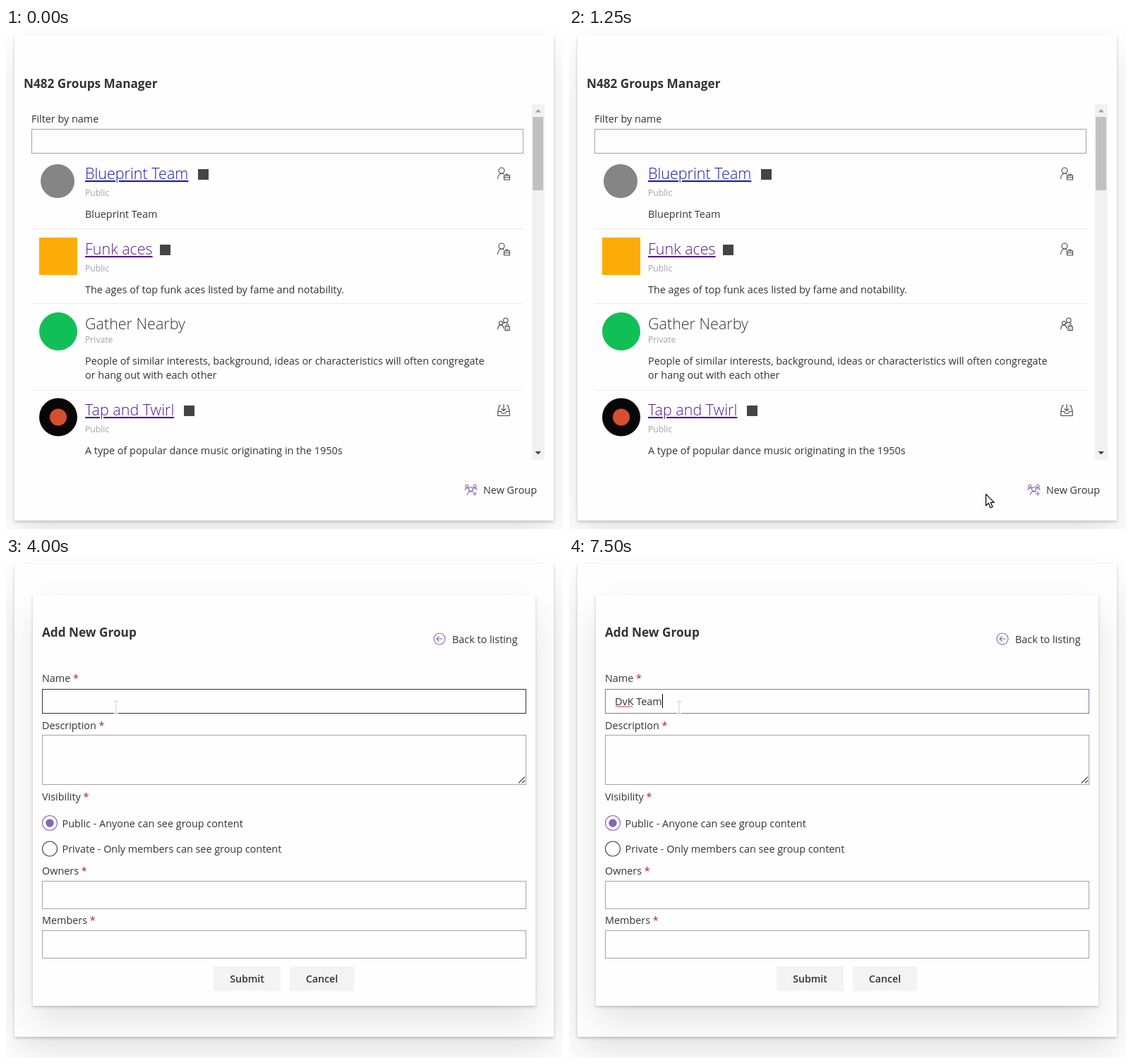
An HTML page that plays this animation: 789x710 px, repeating every 8000 ms.

```html
<!DOCTYPE html>
<html lang="en">
<head>
<meta charset="utf-8">
<title>Groups manager</title>
<style>
  html, body { margin: 0; width: 100%; height: 100%; overflow: hidden; background: #fff; }
  #stage { position: relative; width: 789px; height: 710px; overflow: hidden; }
  .card {
    position: absolute; background: #fefefe;
    box-shadow: 0 2px 4px rgba(0,0,0,.2), 0 24px 48px rgba(0,0,0,.1);
  }
  #outer { left: 12px; top: 10px; width: 764px; height: 688px; }
  #inner { left: 38px; top: 54px; width: 712px; height: 582px; }
  svg { position: absolute; left: 0; top: 0; }
  text { font: 14.4px "Open Sans", "Noto Sans", sans-serif; fill: #333; white-space: pre; }
  .head { font-size: 17.2px; font-weight: 700; }
  .title { font-size: 21.5px; font-weight: 300; }
  .link { text-decoration: underline; }
  .small { font-size: 12.2px; fill: #a3a3a3; }
  .button { font-size: 14.2px; font-weight: 600; text-anchor: middle; }
  .star { fill: #a4262c; }
  .field { fill: #fefefe; stroke: #a3a3a3; }
  .field.hover { stroke: #333; }
  .field.focus { stroke: #7f7a9f; }
  .icon { fill: none; stroke: #444; stroke-width: 1.1; }
  .purple { stroke: #8764b8; }
  .on text { fill: #8764b8; }
</style>
</head>
<body>
<div id="stage">
  <div id="outer" class="card"></div>
  <div id="inner" class="card"></div>
  <svg id="list" width="789" height="710"></svg>
  <svg id="form" width="789" height="710"></svg>
  <svg width="789" height="710">
    <g id="pointer" stroke="#000" stroke-linejoin="round">
      <path id="arrow" fill="#fff" stroke-width="1.2" d="M.6 .6V17L4.4 13.4 7 20 10 18.8 7.3 12.4H12.3Z"/>
      <path id="hand" fill="#fff" stroke-width="1.2" d="M6 16V2.5Q6 .6 7.5 .6T9.2 2.5V9Q12 7.8 12.4 9.8 15 8.8 15.3 11 18.2 10.4 18.2 13V18Q18 21 16 23V26.4H7.5V24L1.5 16.5Q.2 14 2 13.2 3.5 12.8 6 16ZM9.2 9V13M12.4 9.8V13.4M15.3 11V14"/>
      <path id="beam" fill="none" stroke="#cfcfcf" d="M-3 -8.5H-1Q0 -8.5 0 -7.5V7.5Q0 8.5 -1 8.5H-3M3 -8.5H1Q0 -8.5 0 -7.5M0 7.5Q0 8.5 1 8.5H3"/>
    </g>
  </svg>
</div>
<script>
const $ = id => document.getElementById(id);
const text = (x, y, s, cls = "") => `<text x="${x}" y="${y}" class="${cls}">${s}</text>`;
const box = (x, y, w, h, fill) => `<rect x="${x}" y="${y}" width="${w}" height="${h}" fill="${fill}"/>`;
const disc = (x, y, r, fill) => `<circle cx="${x}" cy="${y}" r="${r}" fill="${fill}"/>`;
const icon = (x, y, d, cls = "") => `<path class="icon ${cls}" transform="translate(${x} ${y})" d="${d}"/>`;

const person = "M10 5A4 4 0 1 1 2 5A4 4 0 1 1 10 5M.5 17Q1 9.5 6 9Q8 9 9.5 10.2";
const icons = {
  work: person + "M9.5 12H17.5V18H9.5ZM12 12V10.2H15V12M9.5 14.8H17.5",
  lock: "M7.5 8A2.5 2.5 0 1 1 2.5 8A2.5 2.5 0 1 1 7.5 8M15 4.2A3.2 3.2 0 1 1 8.6 4.2A3.2 3.2 0 1 1 15 4.2M.5 17Q1 11 5 10.6Q8.5 11 9 16M8 9Q10 7.2 12 7.4Q14 7.6 15.3 9M11 13H17.2V18.4H11ZM12.3 13V11.5Q14.1 9 15.9 11.5V13M14.1 15V16.5",
  tray: "M5 3H3L.8 11V17.5H17.2V11L15 3H13M.8 11.5H5.5Q6 14.5 9 14.5T12.5 11.5H17.2M9 1V10.5M5.8 7.5L9 10.5 12.2 7.5",
  group: "M12 7.5A3 3 0 1 1 6 7.5A3 3 0 1 1 12 7.5M5.3 3.2A2 2 0 1 1 1.3 3.2A2 2 0 1 1 5.3 3.2M16.7 3.2A2 2 0 1 1 12.7 3.2A2 2 0 1 1 16.7 3.2M4 16Q4.5 10.8 9 10.6Q11 10.6 12.3 12M.5 9Q1 5.4 5.5 6M17.5 9Q17 5.4 12.5 6M14.5 11V17M11.5 14H17.5"
};

const rows = [
  { top: 179, base: 214, sub: 238, title: "Blueprint Team", color: "#1b1ba8", mark: 272, kind: "Public", lines: ["Blueprint Team"], icon: "work",
    pic: disc(73, 217, 24, "#858585") },
  { top: 284, base: 321, sub: 345, title: "Funk aces", color: "#551a8b", mark: 218, kind: "Public", lines: ["The ages of top funk aces listed by fame and notability."], icon: "work",
    pic: box(47, 297, 54, 53, "#fdab08") },
  { top: 391, base: 427, sub: 446, title: "Gather Nearby", kind: "Private", icon: "lock",
    lines: ["People of similar interests, background, ideas or characteristics will often congregate", "or hang out with each other"],
    pic: disc(74, 430, 27, "#10c056") },
  { top: 513, base: 549, sub: 573, title: "Tap and Twirl", color: "#551a8b", mark: 252, kind: "Public", lines: ["A type of popular dance music originating in the 1950s"], icon: "tray",
    pic: box(47, 524, 54, 55, "#fefefe") + disc(74, 551.5, 27, "#080606") + disc(74, 551.5, 12, "#d6502f") }
];

function drawRow(r, i) {
  const bottom = i < 3 ? rows[i + 1].top : 612;
  const title = r.color
    ? `<text x="112" y="${r.base}" class="title link" style="fill:${r.color}">${r.title}</text>` + box(r.mark, r.base - 14, 15, 15, "#444")
    : text(112, r.base, r.title, "title");
  return `<rect class="row" x="36" y="${r.top}" width="697" height="${bottom - r.top}" fill="#e9e9e9"/>`
    + (i < 3 ? box(36, rows[i + 1].top - (i === 1 ? 1 : 0), 697, 1, "#eaeaea") : "")
    + r.pic + title + text(112, r.sub, r.kind, "small")
    + r.lines.map((s, n) => text(112, r.sub + 31 + n * 20, s)).join("")
    + icon(696, r.base - 17, icons[r.icon]);
}

$("list").innerHTML =
  text(25, 85, "N482 Groups Manager", "head") + text(36, 134, "Filter by name")
  + `<rect class="field" x="36.5" y="143.5" width="696" height="34"/>`
  + rows.map(drawRow).join("")
  + box(745, 108, 18, 504, "#f1f1f1") + box(746, 126, 15, 104, "#c1c1c1")
  + `<path fill="#a3a3a3" d="M749.5 119.5H758L753.8 115Z"/><path fill="#444" d="M749.5 600H758L753.8 604.5Z"/>`
  + `<g id="add">${icon(649.5, 646, icons.group, "purple")}${text(676, 660, "New Group")}</g>`;

const label = (y, s) => text(51, y, `${s} <tspan class="star">*</tspan>`);
const field = (id, y, h) => `<rect id="${id}" class="field" x="51.5" y="${y}.5" width="685" height="${h}"/>`;
const wave = "M66 213" + "l2 -2l2 2".repeat(6);

$("form").innerHTML =
  text(51, 113, "Add New Group", "head")
  + icon(606, 108, "M16 8A8 8 0 1 1 0 8A8 8 0 1 1 16 8M12.5 8H4M7.5 4.5L4 8 7.5 11.5", "purple")
  + text(632, 122, "Back to listing")
  + label(177, "Name") + field("name", 187, 34)
  + label(243.5, "Description") + field("about", 252, 70)
  + `<path class="icon" stroke-width=".8" d="M726 320.5L735 311.5M731 320.5L735 316.5"/>`
  + label(344.5, "Visibility")
  + `<circle class="icon purple" cx="62" cy="377" r="10.5"/>` + disc(62, 377, 5.7, "#8764b8")
  + `<circle class="icon" cx="62" cy="413.5" r="10.5"/>`
  + text(79.5, 382.5, "Public - Anyone can see group content")
  + text(79.5, 419, "Private - Only members can see group content")
  + label(449.5, "Owners") + field("owners", 459, 39)
  + label(520, "Members") + field("members", 529, 39)
  + box(294, 580, 95, 35, "#f3f3f3") + text(341.5, 603, "Submit", "button")
  + box(402, 580, 91, 35, "#f3f3f3") + text(447.5, 603, "Cancel", "button")
  + `<text id="typed" x="65" y="210"></text>`
  + `<path id="wave" fill="none" stroke="#d64545" d="${wave}"/>`
  + `<rect id="caret" y="194" width="1" height="20" fill="#000"/>`;

// time, pointer, x, y, hovered part
const moves = [
  [0, ""], [250, "arrow", 3, 115], [500, "arrow", 201, 141],
  [750, "arrow", 436, 379, 1], [1000, "arrow", 518, 614, 3],
  [1250, "arrow", 590, 660], [1500, "hand", 660, 668, "add"], [1750, "hand", 696, 656, "add"],
  [3000, "arrow", 695, 656], [3250, "arrow", 689, 660],
  [3500, "arrow", 600, 505, "members"], [3750, "beam", 380, 300, "about"],
  [4000, "beam", 156, 213, "name"], [4250, "beam", 156, 213]
];
// time, typed text, caret visible
const typing = [
  [0, "", 0], [4250, "", 1], [4750, "", 0], [5250, "D", 1], [5500, "Dv", 1], [5750, "DvK", 1],
  [6250, "DvK ", 1], [6750, "DvK Te", 1], [7000, "DvK Tea", 1], [7250, "DvK Team", 1]
];
const at = (table, t) => table.findLast(s => s[0] <= t);
const show = (el, on) => el.style.display = on ? "" : "none";
const rowEls = [...document.querySelectorAll(".row")];

function draw(t) {
  const [, kind, x = 0, y = 0, over] = at(moves, t);
  const [, value, caret] = at(typing, t);
  const adding = t >= 3000;
  show($("list"), !adding);
  show($("form"), adding);
  show($("inner"), adding);
  $("outer").style.height = (adding ? 670 : 688) + "px";
  $("pointer").setAttribute("transform", `translate(${x} ${y})`);
  for (const id of ["arrow", "hand", "beam"]) show($(id), id === kind);
  rowEls.forEach((el, i) => show(el, i === over));
  $("add").classList.toggle("on", over === "add");
  for (const id of ["name", "about", "members"]) $(id).classList.toggle("hover", id === over);
  $("name").classList.toggle("focus", t >= 4250);
  $("typed").textContent = value;
  show($("caret"), caret);
  show($("wave"), t >= 6250);
  if (caret) $("caret").setAttribute("x", Math.round(65 + (value ? $("typed").getComputedTextLength() : 0)));
}

const start = performance.now();
let last;
function tick() {
  const t = (performance.now() - start) % 8000;
  const step = Math.floor(t / 250);
  if (step !== last) draw(t);
  last = step;
  requestAnimationFrame(tick);
}
tick();
</script>
</body>
</html>
```
